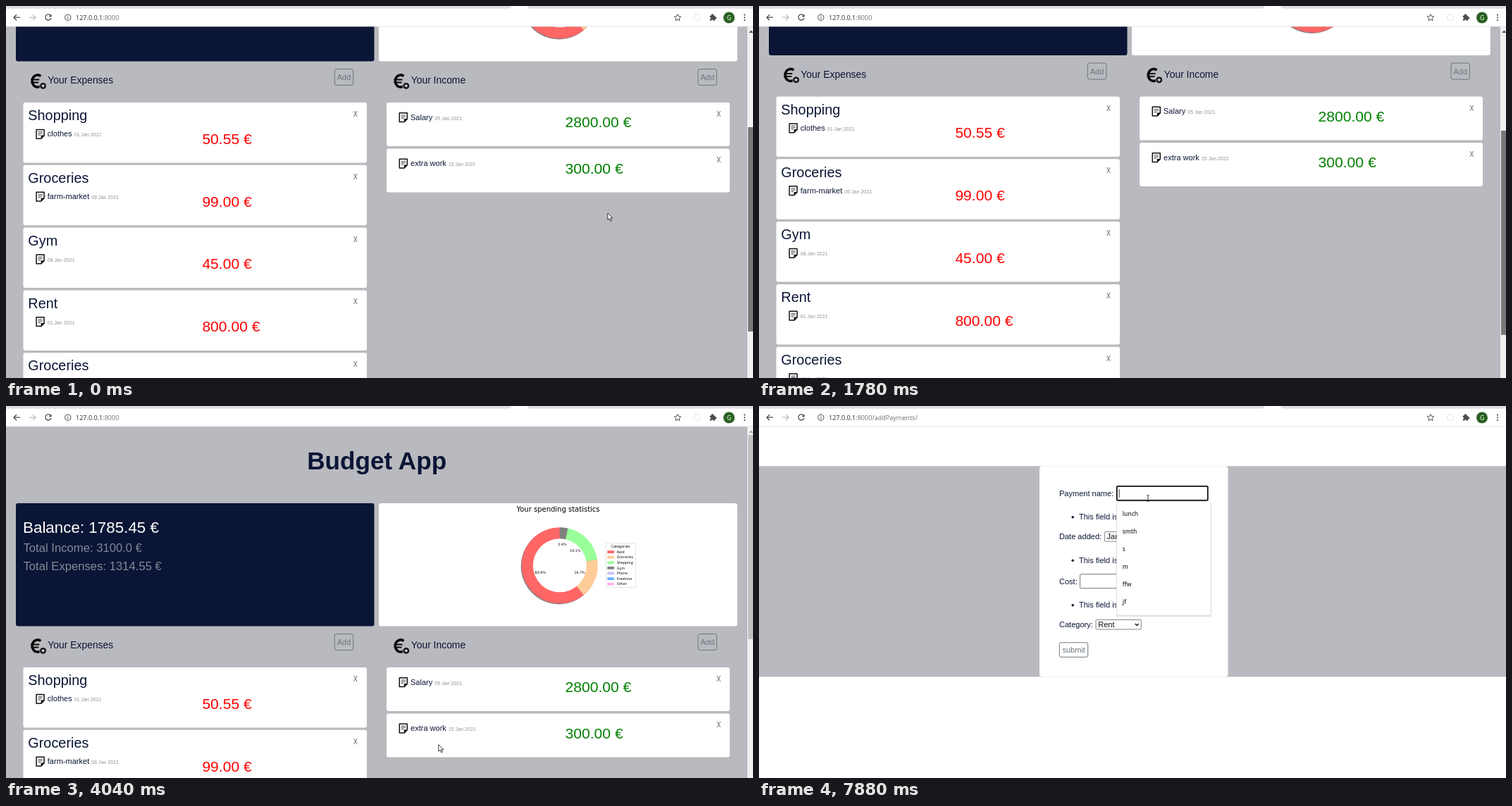
An HTML page for the animation above (8000 ms loop, 1060 px wide and 528 px high).

```html
<!DOCTYPE html>
<html lang="en">
<head>
<meta charset="utf-8">
<title>Budget App</title>
<style>
html, body { margin: 0; width: 100%; height: 100%; overflow: hidden; background: #fff; }
svg { display: block; width: 1060px; height: 528px; }
text { font-family: "Liberation Sans", Arial, sans-serif; white-space: pre; }
.ui text { font-family: "Open Sans", "Noto Sans", sans-serif; }
.plot text { font-family: "DejaVu Sans", sans-serif; }
</style>
</head>
<body>
<svg id="stage" viewBox="0 0 1060 528" xmlns="http://www.w3.org/2000/svg"></svg>
<script>
const LOOP = 8000, NAVY = '#0b1535', GREY = '#b9babf', SLATE = '#6c757d';

const text = (x, y, size, str, fill = NAVY, more = '') =>
  `<text x="${x}" y="${y}" font-size="${size}" fill="${fill}" ${more}>${str}</text>`;
const rect = (x, y, w, h, fill, more = '') =>
  `<rect x="${x}" y="${y}" width="${w}" height="${h}" fill="${fill}" ${more}/>`;
const line = (d, stroke, width = 1, more = '') =>
  `<path d="${d}" fill="none" stroke="${stroke}" stroke-width="${width}" ${more}/>`;
const disc = (x, y, r, fill, more = '') =>
  `<circle cx="${x}" cy="${y}" r="${r}" fill="${fill}" ${more}/>`;
const group = (id, body, more = '') => `<g id="${id}" ${more}>${body}</g>`;
const MIDDLE = 'text-anchor="middle"';

// ---------- budget page ----------
const note = (x, y) =>
  line(`M${x + .8} ${y + .8}h11v8.6l-4.2 4.2h-6.8z`, '#111', 1.5, 'stroke-linejoin="round"') +
  `<path d="M${x + 7.3} ${y + 14}v-5h5z" fill="#111"/>` +
  line(`M${x + 3.2} ${y + 4}h6.2m-6.2 2.2h6.2m-6.2 2.2h3.6`, '#333', .9);

const euro = x =>
  line(`M${x + 14} 333.6a7.6 8.6 0 1 0 0 13.8`, '#0a0a0a', 3.6) +
  line(`M${x} 338.6h12m-12 4h11`, '#0a0a0a', 2) +
  disc(x + 17.3, 347.4, 5.2, GREY) + disc(x + 17.3, 347.4, 4.4, '#0a0a0a') +
  line(`M${x + 15} 347.4h4.6m-2.3-2.3v4.6`, '#fff', 1.1);

const addButton = (x, id) => group(id,
  rect(x, 323.5, 26.5, 23, 'transparent', `rx="2.8" stroke="${SLATE}"`) +
  text(x + 13.3, 339, 11.04, 'Add', SLATE, MIDDLE));

const titled = (x, y, size, name, date, amount, color, amountX, amountY) =>
  note(x, y - 10.6) +
  `<text x="${x + 16.5}" y="${y}" font-size="11.04" fill="${NAVY}">${name ? name + ' ' : ''}` +
  `<tspan font-size="7.06" fill="#909296">${date}</tspan></text>` +
  text(amountX, amountY, 21.1, amount + ' €', color);

const close = (x, y) => text(x, y, 10, 'X', '#70757c', `${MIDDLE} style="font-family:Roboto,sans-serif"`);

const expenses = [
  ['Shopping', 'clothes', '01', '50.55'], ['Groceries', 'farm-market', '06', '99.00'],
  ['Gym', '', '08', '45.00'], ['Rent', '', '01', '800.00'],
  ['Groceries', '', '12', '120.00'], ['Shopping', '', '15', '200.00'],
].map(([kind, name, day, cost], i) => {
  const y = 371 + i * 88.8;
  return rect(24.5, y, 487.5, 85.5, '#fff', 'rx="3"') + text(31.3, y + 25.2, 19.87, kind) +
    titled(42.3, y + 48.2, 0, name, day + ' Jan 2021', cost, '#f00', 278.4, y + 58.7) +
    close(496, y + 20);
}).join('');

const incomes = [['Salary', '05', '2800.00'], ['extra work', '15', '300.00']].map(([name, day, cost], i) => {
  const y = 371 + i * 65.4;
  return rect(540, y, 487, 62, '#fff', 'rx="3"') +
    titled(557.5, y + 24.6, 0, name, day + ' Jan 2021', cost, '#008000', 793.5, y + 35.2) +
    close(1011.3, y + 20);
}).join('');

const categories = [
  ['Rent', '#ff6666', 60.9, 758.3, 237.8], ['Groceries', '#ffcc99', 16.7, 814, 237.8],
  ['Shopping', '#99ff99', 19.1, 807.8, 207.4], ['Gym', '#808080', 3.4, 789.3, 198.3],
  ['Phone', '#c2c2f0'], ['Freetime', '#66b3ff'], ['Other', '#ffb3e6'],
];

function chart() {
  const cx = 785.8, cy = 226.3, R = 54, r = 38;
  const at = (a, rad) => `${(cx + rad * Math.cos(a)).toFixed(2)} ${(cy - rad * Math.sin(a)).toFixed(2)}`;
  let angle = Math.PI / 2, body = disc(cx - 1.1, cy + 1.1, R, '#858080'), labels = '';
  categories.forEach(([name, color, share, x, y], i) => {
    if (share) {
      const end = angle + share / 100.1 * 2 * Math.PI, big = share > 50 ? 1 : 0;
      body += `<path d="M${cx} ${cy}L${at(angle, R)}A${R} ${R} 0 ${big} 0 ${at(end, R)}z" fill="${color}"/>`;
      labels += text(x, y, 4.9, share + '%', '#000', MIDDLE);
      angle = end;
    }
    const row = 207.2 + i * 7.6;
    labels += rect(853.3, row - 2, 9.6, 3.8, color) + text(866.8, row + 1.6, 4.9, name, '#000');
  });
  return text(783.5, 149.6, 10, 'Your spending statistics', '#000', MIDDLE) + body + disc(cx, cy, r, '#fff') +
    rect(851, 195, 42.3, 62.5, '#fff', 'rx="1" stroke="#d8d8d8" stroke-width=".7"') +
    text(872, 200.9, 5, 'Categories', '#000', MIDDLE) + labels;
}

const budgetPage = group('content',
  text(526.2, 89.5, 35.2, 'Budget App', NAVY, MIDDLE + ' font-weight="700"') +
  rect(14, 138, 508.5, 174.5, NAVY, 'rx="3"') + rect(529, 138, 508.7, 174.5, '#fff', 'rx="3"') +
  text(24, 180.3, 22.4, 'Balance: 1785.45 €', '#fff') +
  text(24.5, 207.2, 16.66, 'Total Income: 3100.0 €', '#858a9a') +
  text(24.5, 232.8, 16.66, 'Total Expenses: 1314.55 €', '#858a9a') +
  group('plot', chart(), 'class="plot"') +
  euro(35.3) + text(59.3, 344, 13.9, 'Your Expenses') +
  euro(550.5) + text(574.7, 344, 13.9, 'Your Income') +
  rect(464.5, 322, 29.5, 26, 'none', `id="ring" rx="4" stroke="${SLATE}" stroke-opacity=".55" stroke-width="2.4"`) +
  addButton(466.3, 'add') + addButton(982, 'addIncome') + expenses + incomes);

const scrollbar = rect(1052, 29, 8, 499, '#f1f1f1') +
  `<path id="up" d="M1054.2 38l3.1-3.4 3.1 3.4z"/>` + rect(1053, 41, 7, 290, '#787878', 'id="thumb"');

// ---------- payment form ----------
const field = (x, y, w, id = '') => rect(x, y, w, 20, '#fff', `id="${id}" rx="1.2" stroke="#767676"`);
const select = (x, y, w, value) =>
  rect(x, y, w, 13.6, '#fff', 'rx="1.2" stroke="#767676" stroke-width=".9"') +
  text(x + 3.2, y + 10.8, 11.04, value, '#111') +
  line(`M${x + w - 8.6} ${y + 5.6}l2.5 2.6 2.5-2.6`, '#111', 1.4);
const label = (y, str) => text(426, y, 11.04, str);
const error = y => disc(445.2, y - 3.4, 1.8, NAVY) + text(454, y, 11.04, 'This field is required.');

const formPage = group('form',
  rect(0, 29, 1060, 499, '#fff') + rect(0, 85.3, 1060, 299, GREY) + rect(398, 85.3, 267.5, 299, '#fff', 'rx="4"') +
  label(128, 'Payment name:') + field(507.8, 113.9, 129, 'name') + error(161.2) +
  label(189.2, 'Date added:') + select(490.4, 178.6, 70.6, 'January') + select(564, 178.6, 29.5, '1') +
  select(596.6, 178.6, 41, '2021') + error(222.7) +
  label(252.8, 'Cost:') + field(455.6, 238.7, 129) + error(286.2) +
  label(314.2, 'Category:') + select(478, 303.4, 64.4, 'Rent') +
  rect(426.3, 335.8, 40.4, 20.6, '#fff', `rx="2.5" stroke="${SLATE}"`) +
  text(446.7, 349.8, 11.04, 'submit', SLATE, MIDDLE) +
  group('suggest',
    rect(507, 137, 135, 162, '#000', 'rx="2.5" opacity=".12"') +
    rect(507.5, 135.8, 134, 161.4, '#fff', 'rx="2.5" stroke="#d4d4d4" stroke-width=".7"') +
    line('M511.2 118v12', '#222', .9) +
    ['lunch', 'smth', 's', 'm', 'ffw', 'jf'].map((s, i) =>
      text(515.7, 155.8 + i * 25.1, 8.4, s, '#333', 'font-weight="600"')).join(''),
    'class="ui"'));

// ---------- browser bar ----------
const INK = '#4a4d51';
const bar = group('bar',
  rect(0, 0, 1060, 29, '#fff') +
  `<path d="M0 0H717.5Q717 3.8 712 3.8H0zM740 0H1060V3.8H745Q740.5 3.8 740 0z" fill="#dedee5"/>` +
  line('M0 29H1060', '#dcdde0', .8) +
  line('M20 16.2h-9m4-4l-4 4 4 4', INK, 1.3) + line('M33 16.2h9m-4-4l4 4-4 4', '#b8babd', 1.2) +
  group('reload', line('M63.4 13.6a4.1 4.1 0 1 0 .6 3.6', INK, 1.3) + `<path d="M64.6 11.6v4h-4z" fill="${INK}"/>`) +
  group('stop', line('M56.6 12.8l6.8 6.8m0-6.8l-6.8 6.8', INK, 1.3)) +
  disc(87.8, 16.3, 4.1, 'none', `stroke="${INK}"`) + line('M87.8 15.8v2.8m0-4.6v1', INK, 1) +
  `<text x="99" y="19.6" font-size="9.05" fill="#2b2d30">127.0.0.1<tspan fill="#6b6f74">:8000</tspan><tspan id="path" fill="#6b6f74">/addPayments/</tspan></text>` +
  line('M953 11.6l1.4 3 3.3.4-2.4 2.3.6 3.3-2.9-1.6-2.9 1.6.6-3.3-2.4-2.3 3.3-.4z', INK, 1) +
  rect(976.8, 12, 8.6, 8.6, 'none', 'rx="1.5" stroke="#d6d8da" stroke-dasharray="2.4 1.2"') +
  rect(998.8, 13.4, 7.4, 7.4, INK, 'rx="1"') + disc(1002.4, 13, 1.7, INK) + disc(1006.6, 17, 1.7, INK) +
  disc(998.8, 17.2, 1.3, '#fff') + disc(1002.4, 20.8, 1.3, '#fff') +
  disc(1026, 16.5, 8, '#276221') + text(1026, 19.6, 8.4, 'G', '#fff', MIDDLE) +
  [12.6, 16.3, 20].map(y => disc(1048, y, 1.1, INK)).join(''), 'class="ui"');

const pointers =
  group('arrow', `<path d="M0 0v9.6l2.3-2 1.6 3.6 1.7-.8-1.6-3.4h3z" fill="#fff" stroke="#222" stroke-width=".9"/>`) +
  group('hand', `<path d="M0 .6q.9-1.3 1.8 0v3.6l3.4.9q1 .3.8 1.5l-.8 3.6H.8l-2.9-3.8q.2-1.2 2.1.2z" fill="#fff" stroke="#222" stroke-width=".8"/>`) +
  group('beam', line('M-1.8-4.4q1.4 0 1.8.8q.4-.8 1.8-.8M0-3.6v7.2M-1.8 4.4q1.4 0 1.8-.8q.4.8 1.8.8', '#222', .9));

const stage = document.getElementById('stage');
stage.innerHTML =
  group('budget', rect(0, 29, 1060, 499, GREY) + budgetPage + scrollbar) + formPage + bar + pointers;

const el = id => document.getElementById(id);
const show = (id, on) => el(id).setAttribute('visibility', on ? 'visible' : 'hidden');
const set = (node, attrs) => { for (const k in attrs) node.setAttribute(k, attrs[k]); };

// time, scroll offset, pointer x, pointer y
const steps = [
  [0, 234, 853.8, 294], [120, 256, 853.8, 300], [300, 279, 853.8, 310], [480, 301, 853.8, 323],
  [660, 323.4, 853.8, 335.3], [900, 345, 890, 365], [1080, 364, 970, 410],
  [1240, 364, 1052, 440], [1430, 340, 1070, 425], [1610, 290, 1070, 400], [1780, 242.5, 1070, 371],
  [1910, 205, 1068, 350], [2060, 165, 1064, 328],
  [2310, 90, 1058, 286], [2500, 38.6, 1056.6, 257], [2650, 12, 1056.5, 243], [2840, 0, 1056, 234],
  [3030, 0, 1055.5, 228], [3230, 0, 1055, 232],
  [3510, 0, 1012, 330], [3700, 0, 890, 445], [3870, 0, 745, 508], [4040, 0, 613.8, 480.6],
  [4190, 0, 550, 430], [4340, 0, 503, 375], [4500, 0, 476.3, 331.5],
  [6870, 0, 516, 262], [7010, 0, 580, 165], [7150, 0, 630, 100], [7290, 0, 590, 119], [7420, 0, 552, 131],
];

function draw(t) {
  const [, scroll, x, y] = steps.filter(s => s[0] <= t).pop();
  const onForm = t >= 6160, loading = t >= 5840 && t < 6470, atRest = t >= 3510;
  el('content').setAttribute('transform', `translate(0 ${-scroll})`);
  set(el('thumb'), { y: 41 + scroll * .56, fill: atRest ? '#c1c1c1' : '#787878' });
  el('up').setAttribute('fill', scroll ? '#505050' : '#a3a3a3');

  const hover = t < 4650 ? 0 : t < 4800 ? .5 : 1;
  const [box, caption] = el('add').children;
  set(box, { fill: SLATE, 'fill-opacity': hover });
  caption.setAttribute('fill', hover ? '#fff' : SLATE);
  show('ring', t >= 5690 && !onForm);

  el('budget').style.display = onForm ? 'none' : '';
  el('form').style.display = onForm ? '' : 'none';
  show('stop', loading);
  show('reload', !loading);
  show('path', t >= 5840);

  const focused = t >= 7880;
  show('suggest', focused);
  set(el('name'), { stroke: focused ? '#101010' : '#767676', 'stroke-width': focused ? 1.8 : 1 });

  const kind = t >= 7290 ? 'beam' : t >= 4500 && !onForm ? 'hand' : 'arrow';
  for (const id of ['arrow', 'hand', 'beam']) {
    show(id, id === kind);
    el(id).setAttribute('transform', `translate(${x} ${y})`);
  }
}

const start = performance.now();
function tick() {
  draw((performance.now() - start) % LOOP);
  requestAnimationFrame(tick);
}
draw(0);
requestAnimationFrame(tick);
</script>
</body>
</html>
```
